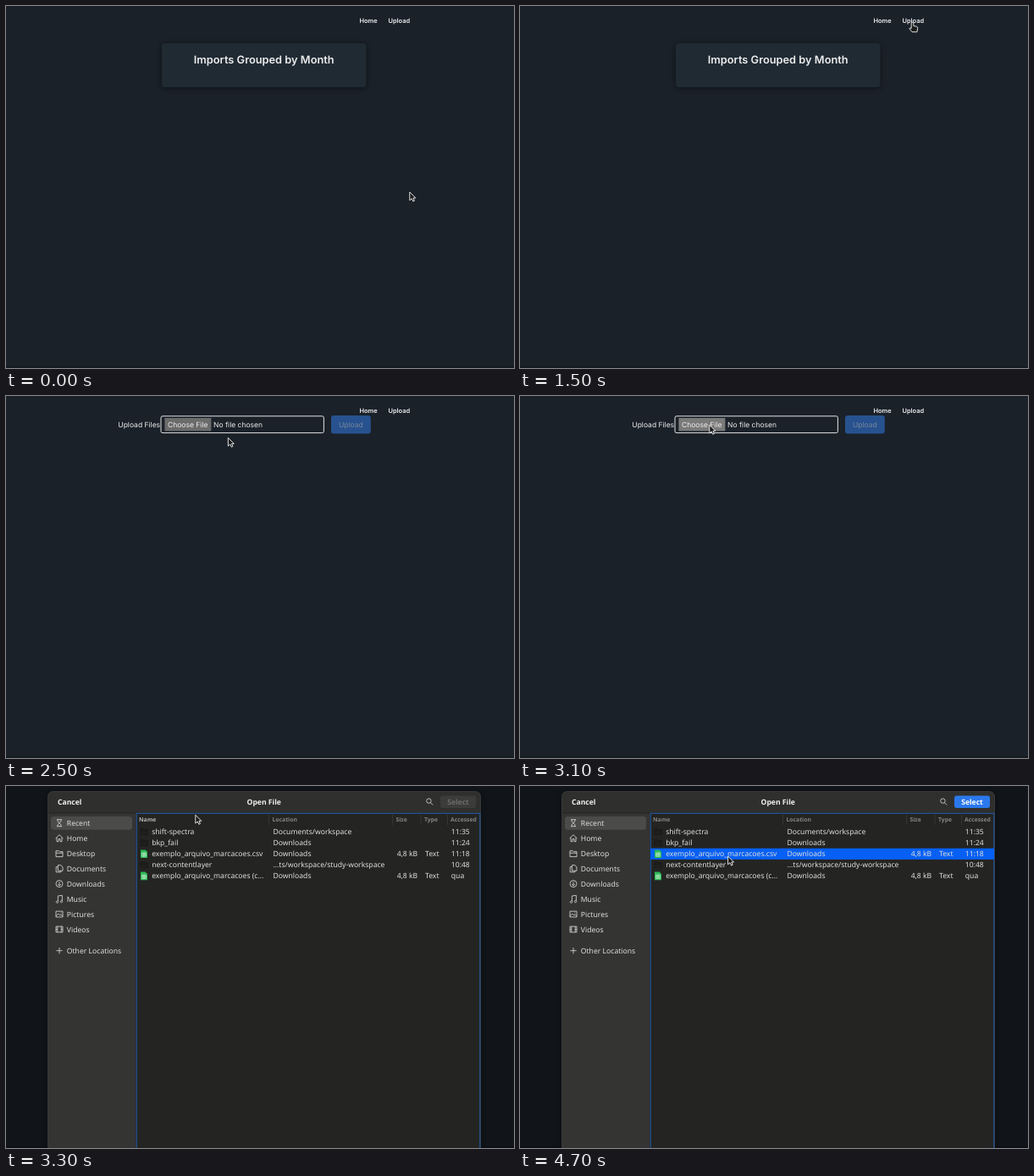
Write an HTML page that moves like this. It is 600x428 px and loops after 5000 ms.

```html
<!DOCTYPE html>
<html lang="en">
<head>
<meta charset="utf-8">
<title>File upload</title>
<style>
  html, body { margin: 0; height: 100%; overflow: hidden; background: #1a2129; }
  svg { display: block; width: 100vw; height: 100vh; text-rendering: geometricPrecision; }
  .web { font: 400 8.53px Inter, sans-serif; fill: #ededee; }
  .nav { font-size: 7.45px; font-weight: 600; }
  .title { font-size: 12.8px; font-weight: 600; text-anchor: middle; }
  .dialog { font: 400 8.6px "Noto Sans", sans-serif; fill: #dededc; }
  .bold { font-weight: 700; fill: #f2f2f0; }
  .head { font-size: 6.8px; font-weight: 700; fill: #858584; }
  .mid { text-anchor: middle; }
  .end { text-anchor: end; }
  .icon { fill: none; stroke: #cfcfcd; stroke-width: .9; }
  .shadow { filter: drop-shadow(0 1px 3px #0007); }
  .pointer { fill: #1b1b1b; stroke: #f4f4f4; stroke-width: .9; stroke-linejoin: round; }
</style>
</head>
<body>
<svg viewBox="0 0 600 428" preserveAspectRatio="none">
  <rect width="600" height="428" fill="#1a2129"/>
  <rect y="426" width="600" height="2" fill="#151a20"/>

  <g class="web">
    <g id="home">
      <rect class="shadow" x="184" y="44" width="241.5" height="52" rx="4" fill="#202a33"/>
      <text class="title" x="304.7" y="68.2">Imports Grouped by Month</text>
    </g>
    <g id="upload">
      <text x="132.3" y="36.6">Upload Files</text>
      <rect x="183" y="23.8" width="192.4" height="19.8" rx="2" fill="none" stroke="#e4e5e6" stroke-width="1"/>
      <rect id="choose" x="187.4" y="26" width="55" height="15.4"/>
      <text x="191" y="36.6">Choose File</text>
      <text x="245" y="36.6">No file chosen</text>
      <rect x="384" y="23" width="46.8" height="21.5" rx="3" fill="#27528f"/>
      <text class="mid" x="407.3" y="36.6" fill="#77859a">Upload</text>
    </g>
    <text class="nav" x="417.4" y="19.7">Home</text>
    <text class="nav" x="451.5" y="19.7">Upload</text>
  </g>

  <rect id="dim" width="600" height="428"/>

  <g id="dialog" class="dialog">
    <rect class="shadow" x="49.5" y="6.5" width="511" height="527" rx="6" fill="#2f2f2e" stroke="#41413f" stroke-width=".8"/>
    <rect x="50" y="32" width="104" height="470" fill="#343433"/>
    <rect x="154" y="32" width="406" height="470" fill="#242423"/>
    <path d="M50 32H560M153.5 32V500" stroke="#1e1e1e" stroke-width=".7"/>
    <rect id="focus" x="154.2" y="32.3" width="405.6" height="480" fill="none" stroke="#2360ad"/>

    <text class="bold" x="61" y="21.6">Cancel</text>
    <text class="bold mid" x="304.7" y="21.6">Open File</text>
    <g class="icon" stroke-width="1.1"><circle cx="499.4" cy="17.6" r="2.7"/><path d="M501.4 19.6L504.2 22.4"/></g>
    <rect x="513" y="11.5" width="42" height="14.5" rx="3" fill="#3c3c3b"/>
    <text class="bold mid" x="534" y="21.6" style="fill:#6c6c6a">Select</text>
    <g id="select">
      <rect x="513" y="11.5" width="42" height="14.5" rx="3" fill="#2b78ec"/>
      <text class="bold mid" x="534" y="21.6" style="fill:#fff">Select</text>
    </g>

    <rect x="53" y="36" width="96" height="15.8" rx="3.5" fill="#4b4b4a"/>
    <g id="places"></g>
    <path d="M310.5 34V46M456.5 34V46M490 34V46M521.5 34V46" stroke="#3b3b3a" stroke-width=".8"/>
    <g id="heads" class="head"></g>
    <rect id="picked" x="154" y="73.7" width="406" height="13.2" fill="#0660f4"/>
    <g id="rows"></g>
  </g>

  <path id="arrow" class="pointer" d="M0 0V9.8L2.4 7.7 4 11 5.6 10.2 4.2 7H7Z"/>
  <path id="hand" class="pointer" d="M-1.3 .9Q0 -.7 1.3 .9V4.2L5 5Q6.4 5.4 6.2 7L5.4 11.4H-.4L-3.6 7.4Q-3.3 5.8 -1.3 7.2Z"/>
</svg>
<script>
const $ = id => document.getElementById(id);
const text = (x, y, s, cls = '') => `<text class="${cls}" x="${x}" y="${y}">${s}</text>`;

// Sidebar icons are drawn around their own centre.
const places = [
  ['Recent', 'M-3 -4H3M-3 4H3M-2.2 -4Q-2.2 -1.5 0 0Q2.2 1.5 2.2 4M2.2 -4Q2.2 -1.5 0 0Q-2.2 1.5 -2.2 4'],
  ['Home', 'M-4.4 .3L0 -4L4.4 .3M-3 -.8V4H-1V1H1V4H3V-.8'],
  ['Desktop', 'M-4 4V-3H-.6L.4 -2H4V4ZM-4 -.4H4'],
  ['Documents', 'M-1.6 -4H1.8L4 -1.8V2.6H-1.6ZM-1.6 -2H-3.8V4.2H2V2.6'],
  ['Downloads', 'M-4 0A4 4 0 1 0 4 0A4 4 0 1 0 -4 0M0 -2.3V2.2M-1.8 .5L0 2.3L1.8 .5'],
  ['Music', 'M-1.6 2.8V-3.6L3.4 -4.2V2.2M-1.6 2.8A1.2 1.2 0 1 1 -1.7 2.7M3.4 2.2A1.2 1.2 0 1 1 3.3 2.1'],
  ['Pictures', 'M-4 -3.4H4V3.4H-4ZM-4 2.4L-1.2 -.6L.8 1.4L2 .2L4 2.4M1.6 -1.6H2.4'],
  ['Videos', 'M-4 -3.4H4V3.4H-4ZM-2.2 -3.4V3.4M2.2 -3.4V3.4M-4 0H-2.2M2.2 0H4'],
  ['Other Locations', 'M-3.6 0H3.6M0 -3.6V3.6']
];
$('places').innerHTML = places.map(([name, d], i) => {
  const y = i < 8 ? 43.7 + i * 17.97 : 194.7;
  return `<path class="icon" transform="translate(63 ${y})" d="${d}"/>` + text(71.8, y + 3.1, name);
}).join('');

$('heads').innerHTML = [[157, 'Name'], [314.5, 'Location'], [460.5, 'Size'], [494, 'Type'], [525, 'Accessed']]
  .map(([x, s]) => text(x, 42.2, s)).join('');
const nameHead = $('heads').firstChild;

const files = [
  ['shift-spectra', 'Documents/workspace', '11:35'],
  ['bkp_fail', 'Downloads', '11:24'],
  ['exemplo_arquivo_marcacoes.csv', 'Downloads', '11:18', '4,8 kB'],
  ['next-contentlayer', '…ts/workspace/study-workspace', '10:48'],
  ['exemplo_arquivo_marcacoes (c…', 'Downloads', 'qua', '4,8 kB']
];
const sheet = `<path d="M-4 -4.8H1.6L4 -2.4V4.8H-4Z" fill="#2db955"/>
  <path d="M-2.2 -1.2H2.2V3H-2.2ZM-2.2 .9H2.2M0 -1.2V3" fill="none" stroke="#e3f7e8" stroke-width=".7"/>`;
const folder = '<path d="M-4.2 3.6V-3.6H-1L0 -2.5H4.2V3.6ZM-4.2 -1.2H4.2" fill="#20201f" stroke="#181818" stroke-width=".7"/>';
$('rows').innerHTML = files.map(([name, place, time, size], i) => {
  const y = 54 + i * 13.1, base = y + 3;
  return `<g transform="translate(163 ${y})">${size ? sheet : folder}</g>` +
    text(172.2, base, name) + text(315.5, base, place) + text(525.8, base, time) +
    (size ? text(486.2, base, size, 'end') + text(495, base, 'Text') : '');
}).join('');

// Pointer moves: start time, number of steps, then start, control and end points.
const STEP = 100, LOOP = 5000;
const moves = [
  [0, 1, [476.8, 220], [476.8, 220], [476.8, 220]],
  [300, 1, [476.8, 220], [477, 220], [478, 220]],
  [600, 6, [478, 220], [420, 70], [461, 22]],
  [1200, 2, [461, 22], [462, 22], [463.5, 22]],
  [1500, 1, [463.5, 22], [463.5, 20], [463.5, 19.3]],
  [2100, 6, [463.5, 19.3], [400, 128], [239, 37]],
  [2700, 2, [239, 37], [228, 35], [223.8, 34.3]],
  [3700, 4, [223.8, 34.3], [234, 58], [245.6, 83]]
];
const ease = u => u * u * (3 - 2 * u);

function pointerAt(t) {
  const [start, steps, a, b, c] = moves.findLast(m => m[0] <= t);
  const u = ease(Math.min(1, ((t - start) / STEP + 1) / steps));
  return a.map((v, i) => (1 - u) ** 2 * v + 2 * u * (1 - u) * b[i] + u * u * c[i]);
}

const show = (el, on) => el.style.display = on ? '' : 'none';

function draw(now) {
  const t = Math.floor(now % LOOP / STEP) * STEP;
  const open = t >= 3200, settled = t >= 3300, picked = t >= 4500;
  const hand = t >= 1200 && t < 2100;

  show($('home'), t < 1800);
  show($('upload'), t >= 1800);
  $('choose').setAttribute('fill', t === 3000 ? '#858585' : t >= 2700 ? '#7a7a7a' : '#6b6b6b');

  $('dim').setAttribute('opacity', settled ? .36 : open ? .1 : 0);
  show($('dialog'), open);
  $('dialog').setAttribute('transform', settled ? '' : 'translate(0 270) scale(1 .991) translate(0 -270)');
  $('focus').setAttribute('opacity', settled ? 1 : .2);
  nameHead.style.fill = t < 3700 ? '#b4b4b2' : '';
  show($('picked'), picked);
  $('select').setAttribute('opacity', picked ? Math.min(1, .4 + (t - 4500) / STEP * .35) : 0);

  const at = `translate(${pointerAt(t)})`;
  $('arrow').setAttribute('transform', at);
  $('hand').setAttribute('transform', at);
  show($('arrow'), !hand);
  show($('hand'), hand);
}

const t0 = performance.now();
function tick() {
  draw(performance.now() - t0);
  requestAnimationFrame(tick);
}
tick();
</script>
</body>
</html>
```
